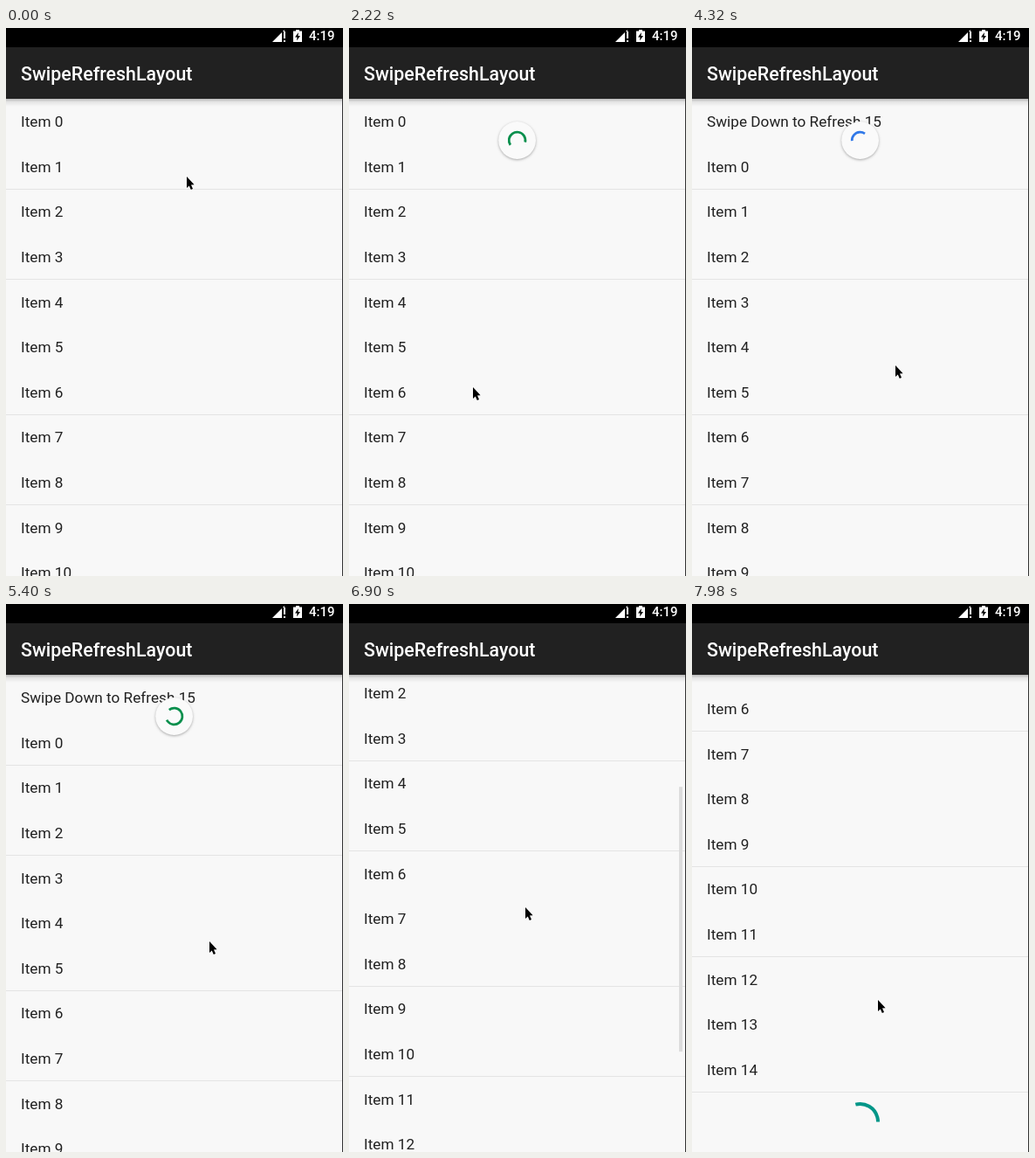
Recreate the animation shown at these times as an HTML page with a canvas. Size 386x627 px, loop 8000 ms.

```html
<!DOCTYPE html>
<html lang="en">
<head>
<meta charset="utf-8">
<title>SwipeRefreshLayout</title>
<style>
html, body { margin: 0; height: 100%; overflow: hidden; background: #f8f8f8; }
canvas { display: block; width: 100vw; height: 100vh; }
</style>
</head>
<body>
<canvas id="stage" width="386" height="627"></canvas>
<script>
const c = document.getElementById('stage').getContext('2d');
const W = 386, H = 627, LOOP = 8000, STEP = 60;
const TOP = 81, ROW = 51.6, MID = 192.6, REST = 128.5;
const FINISH = 753, CYCLE = 1507, SWEEP = 288;
const COLORS = ['#3078e8', '#088f4c'];

// One entry per pull: times of drag, release, spin and completion; base is the arc's angle.
const PULLS = [
  { drag: 540, release: 840, spin: 1080, end: 3240, base: 85 },
  { drag: 3720, release: 3900, spin: 4040, end: 6300, base: 138 }
];
const CURSOR = [
  [0, 207, 170], [300, 181, 104], [540, 181, 104], [700, 168, 207], [900, 142, 411],
  [2980, 142, 411], [3120, 153, 394], [3300, 216, 221], [3420, 235, 165], [3540, 235, 107],
  [3720, 235, 107], [3900, 233, 386], [6640, 233, 386], [6780, 178, 570], [6840, 190, 543],
  [6960, 214, 150], [7080, 216, 345], [7200, 213, 441], [7260, 213, 453]
];
const SCROLL = [[6820, 0], [6960, 370], [7080, 400]];

const clamp = v => Math.max(0, Math.min(1, v));
const part = (t, a, b) => clamp((t - a) / (b - a));
const mix = (a, b, u) => a + (b - a) * u;

function track(keys, t) {
  const i = keys.findIndex(k => k[0] > t);
  if (i < 0) return keys[keys.length - 1].slice(1);
  if (!i) return keys[0].slice(1);
  const a = keys[i - 1], b = keys[i], u = part(t, a[0], b[0]);
  return a.slice(1).map((v, j) => mix(v, b[j + 1], u));
}

// cubic-bezier(.4, 0, .2, 1)
function ease(x) {
  let lo = 0, hi = 1, s = 0.5;
  for (let i = 0; i < 20; i++) {
    s = (lo + hi) / 2;
    const bx = 1.2 * s * (1 - s) ** 2 + 0.6 * s * s * (1 - s) + s ** 3;
    if (bx < x) lo = s; else hi = s;
  }
  return 3 * s * s * (1 - s) + s ** 3;
}

function rect(x, y, w, h, color) {
  c.fillStyle = color;
  c.fillRect(x, y, w, h);
}

function text(str, x, y, font, color) {
  c.font = font + ' Roboto, sans-serif';
  c.fillStyle = color;
  c.fillText(str, x, y);
}

function poly(points, color) {
  c.beginPath();
  points.forEach(p => c.lineTo(...p));
  c.closePath();
  c.fillStyle = color;
  c.fill();
}

function arc(x, y, r, start, sweep, width, color) {
  const a = start * Math.PI / 180;
  c.beginPath();
  c.arc(x, y, r, a, a + sweep * Math.PI / 180);
  c.lineWidth = width;
  c.strokeStyle = color;
  c.stroke();
}

function drawList(t, scroll) {
  const added = PULLS.filter(p => t >= p.end).length;
  for (let i = 0; i < 15 + added; i++) {
    const y = TOP + i * ROW - scroll;
    const label = i < added ? 'Swipe Down to Refresh ' + (14 + added - i) : 'Item ' + (i - added);
    text(label, 17, Math.round(y + 32.2), '17.2px', '#212121');
    // Hairlines survive only on some pixel rows.
    const line = y + ROW, f = line - Math.floor(line);
    if (f > 0.1 && f < 0.5) rect(0, Math.floor(line), W, 1, '#e4e4e4');
  }
}

function drawFooter(t, scroll) {
  const s = Math.max(0, t - 7045);
  const wave = u => 0.5 - 0.5 * Math.cos(Math.PI * clamp(u));
  const shrink = wave((s - 660) / 460);
  const len = 16 + 254 * (wave(s / 460) - shrink);
  const start = -66 + 0.2 * (t - 7200) + 254 * shrink;
  arc(192.5, 992.5 - scroll, 20.5, start, len, 4, '#009688');
}

function drawScrollbar(t, scroll) {
  c.globalAlpha = part(t, 6780, 6840) * (1 - part(t, 7170, 7440));
  rect(378, 85 + 235 * scroll / 400, 4, 303, '#dcdcdc');
  c.globalAlpha = 1;
}

function pullArc(p, t) {
  if (t < p.spin + FINISH) {
    const u = part(t, p.spin, p.spin + FINISH);
    const len = Math.max(8, SWEEP * (1 - ease(u)) * part(t, p.drag, p.release));
    const turn = 120 * (1 - part(t, p.drag, p.release));
    return { start: p.base + 53 + 307 * u - turn - len, len, color: COLORS[0] };
  }
  const q = Math.min(1, (t - p.spin - FINISH) / CYCLE);
  const tail = SWEEP * ease(clamp(2 * q - 1)), head = SWEEP * ease(clamp(2 * q));
  return { start: p.base + 234 * q + tail, len: Math.max(12, head - tail), color: COLORS[1] };
}

function drawPull(p, t) {
  const scale = 1 - part(t, p.end, p.end + 120);
  if (t < p.drag || scale <= 0) return;
  const y = t < p.release
    ? mix(59.5, 150, part(t, p.drag, p.release))
    : mix(150, REST, ease(part(t, p.release, p.spin)));
  c.save();
  c.translate(MID, y);
  c.scale(scale, scale);
  c.save();
  c.shadowColor = 'rgba(0,0,0,.32)';
  c.shadowBlur = 3;
  c.shadowOffsetY = 1;
  c.beginPath();
  c.arc(0, 0, 21.4, 0, 7);
  c.fillStyle = '#fafafa';
  c.fill();
  c.restore();
  const a = pullArc(p, t);
  arc(0, 0, 9.4, a.start, a.len, 2.7, a.color);
  if (t < p.spin) {
    c.rotate((a.start + a.len) * Math.PI / 180);
    poly([[4.5, 0], [14.5, 0], [9.5, 5]], a.color);
  }
  c.restore();
}

function drawBars() {
  const g = c.createLinearGradient(0, TOP, 0, TOP + 9);
  g.addColorStop(0, 'rgba(0,0,0,.26)');
  g.addColorStop(0.4, 'rgba(0,0,0,.08)');
  g.addColorStop(1, 'rgba(0,0,0,0)');
  rect(0, TOP, W, 9, g);
}

function drawHeader() {
  rect(0, 0, W, 22, '#000');
  rect(0, 22, W, TOP - 22, '#212121');
  text('SwipeRefreshLayout', 17, 60, '500 21.4px', '#fff');
  // Signal
  poly([[305, 16], [319, 2], [319, 16]], '#fff');
  rect(316, 4, 5, 12, '#000');
  rect(318, 4, 2, 8, '#fff');
  rect(318, 14, 2, 2, '#fff');
  // Battery
  rect(329, 3.5, 10, 12.5, '#fff');
  rect(332, 2, 4, 2, '#fff');
  poly([[335, 5], [331, 10.5], [333.5, 10.5], [333, 14.5], [337, 9], [334.5, 9]], '#000');
  text('4:19', 347, 14, '500 15px', '#fff');
}

function drawCursor(t) {
  const [x, y] = track(CURSOR, t);
  c.save();
  c.translate(Math.round(x), Math.round(y));
  c.lineWidth = 1.2;
  c.strokeStyle = '#fff';
  poly([[0, 0], [0, 13], [2.8, 10.4], [4.8, 15], [7, 14], [5, 9.6], [8.6, 9.3]], '#000');
  c.stroke();
  c.fill();
  c.restore();
}

function draw(t) {
  const [scroll] = track(SCROLL, t);
  rect(0, 0, W, H, '#f8f8f8');
  drawList(t, scroll);
  drawFooter(t, scroll);
  drawScrollbar(t, scroll);
  drawBars();
  PULLS.forEach(p => drawPull(p, t));
  drawHeader();
  rect(385, TOP, 1, H - TOP, '#333');
  drawCursor(t);
}

const begin = performance.now();
function frame() {
  const t = (performance.now() - begin) % LOOP;
  draw(Math.floor(t / STEP) * STEP);
  requestAnimationFrame(frame);
}
frame();
</script>
</body>
</html>
```
